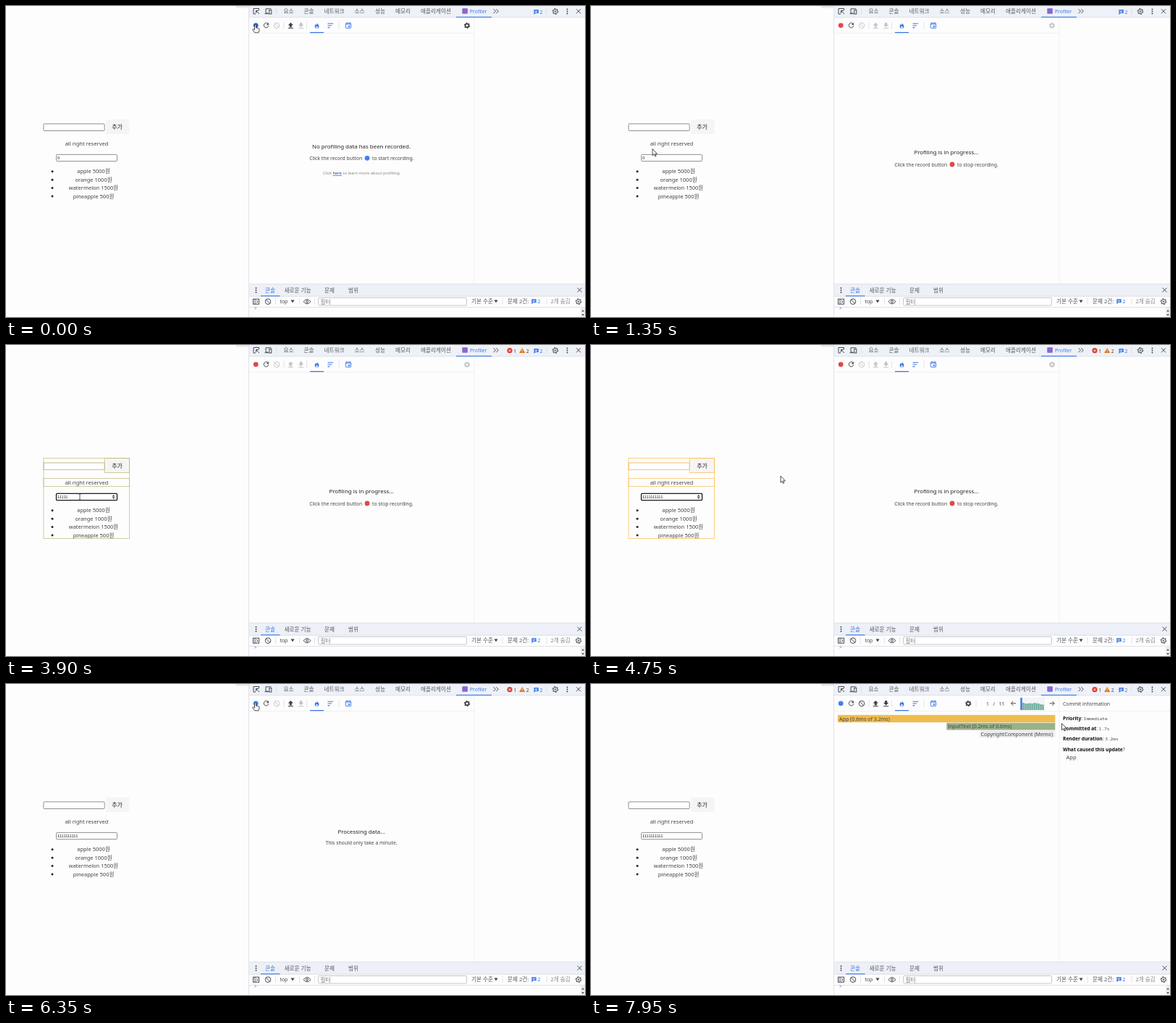
Animation of 800x430 px, one loop 8000 ms. Source, as an HTML page:

```html
<!DOCTYPE html>
<html lang="ko">
<head>
<meta charset="utf-8">
<style>
  html, body { margin: 0; width: 100%; height: 100%; overflow: hidden; background: #fefdfe; }
  svg { display: block; width: 100vw; height: 100vh; }
  text { font-family: "Noto Sans", "Noto Sans CJK KR", "Noto Sans CJK", sans-serif; font-size: 7.5px; fill: #444; white-space: pre; }
  .tab { font-size: 7.6px; fill: #55585d; }
  .small { font-size: 6.8px; }
  .head { font-size: 7.9px; fill: #222; }
  .mid { text-anchor: middle; }
  .mono { font-family: "Noto Sans Mono", "DejaVu Sans Mono", monospace; font-size: 6.1px; }
  .field { font-family: "Liberation Sans", Arial, sans-serif; font-size: 5.8px; fill: #222; }
  .blue { fill: #3b78e7; }
  .line { fill: none; stroke: #484b50; stroke-width: 1; }
  .off { opacity: .3; }
  .rule { fill: none; stroke: #d9dce3; stroke-width: .8; }
  .faint { fill: none; stroke: #f0f0f3; }
</style>
</head>
<body>
<svg viewBox="0 0 800 430" preserveAspectRatio="none">
  <defs>
    <linearGradient id="shade" x2="0" y2="1"><stop stop-color="#999" stop-opacity=".5"/><stop offset="1" stop-color="#999" stop-opacity="0"/></linearGradient>
    <g id="gear" fill="none" stroke="#484b50"><circle r="3.1" stroke-width="1"/><circle r="4" stroke-width="1" stroke-dasharray="1.7 2.49"/><circle r=".9" stroke-width=".9"/></g>
    <g id="solidGear" fill="none" stroke="#484b50"><circle r="2.4" stroke-width="1.9"/><circle r="3.6" stroke-width="1.2" stroke-dasharray="1.8 1.97"/></g>
    <g id="close" class="line"><path d="M-3-3 3 3M3-3-3 3"/></g>
    <g id="dots" fill="#3c3f43"><circle cy="-3" r=".9"/><circle r=".9"/><circle cy="3" r=".9"/></g>
    <g id="block" class="line"><circle r="3.8"/><path d="M-2.7-2.7 2.7 2.7"/></g>
    <path id="up" fill="#3c3f43" d="M0-4 3.6-.4H1.5V2.4H-1.5V-.4H-3.6ZM-3.6 3.2H3.6V4.2H-3.6Z"/>
    <path id="down" fill="#3c3f43" d="M0 2.4 3.6-1.2H1.5V-4H-1.5V-1.2H-3.6ZM-3.6 3.2H3.6V4.2H-3.6Z"/>
    <path id="issue" fill="#3b78e7" d="M-3.2-3H3.2V2H-1L-3.2 4ZM-1.8-1.5V-.7H1.8V-1.5ZM-1.8 .1V.9H1.2V.1Z" fill-rule="evenodd"/>
  </defs>

  <rect width="800" height="430" fill="#fefdfe"/>
  <rect x="318" width="182" height="4" fill="url(#shade)" opacity=".6"/>

  <!-- page -->
  <rect x="138" y="157" width="32.5" height="20" rx="2" fill="#f6f5f6"/>
  <text x="153.5" y="170" class="mid" style="font-size:8px;fill:#222">추가</text>
  <rect id="name" x="51.9" y="162.9" width="84.2" height="9.6" rx="1" fill="#fff" stroke="#858585" stroke-width=".9"/>
  <text x="111.5" y="193" class="mid">all right reserved</text>
  <rect id="amount" x="69.5" y="205.4" width="84" height="9.2" rx="1" fill="#fff"/>
  <text id="value" x="71" y="212" class="field"></text>
  <path id="spinner" d="M146.6 209.4 148.6 207 150.6 209.4ZM146.6 210.6 148.6 213 150.6 210.6Z" fill="#444"/>
  <g id="list"></g>
  <g id="outlines" fill="none" stroke-opacity=".7">
    <rect x="51.9" y="156.5" width="118.6" height="111"/>
    <rect x="51.9" y="162.9" width="84.2" height="9.4"/>
    <rect x="136.5" y="156.5" width="34" height="20"/>
    <rect x="51.9" y="184.5" width="118.6" height="11"/>
  </g>

  <!-- devtools chrome -->
  <rect x="336" width="464" height="15.5" fill="#eef1f7"/>
  <rect x="336" y="384.5" width="464" height="17" fill="#edf0f6"/>
  <path class="faint" d="M336 37.5H647M646.8 16V384"/>
  <path class="rule" d="M335.5 0V430M336 15.7H800M336 384.3H800M336 401.3H800M336 416.5H800M373.5 3V12M747 3V12"/>
  <g class="line"><path d="M349.5 6V3.5H342V11H345"/><path d="M345.5 6.5 350 11M345.5 10V6.5H349"/>
    <path d="M366.5 3.8H359V10H362.5M357.5 10.7H363"/><rect x="363.8" y="5.6" width="3" height="5.4"/></g>
  <g id="tabs"></g>
  <rect x="630.3" y="3.2" width="7.6" height="7.6" rx="1" fill="#8a66d2"/>
  <text x="641" y="10" class="small blue">Profiler</text>
  <path d="M622 14.8H671V16H622ZM352 400.2H378.5V401.4H352Z" fill="#4a82e8"/>
  <path class="line" d="M673.5 4.2 676.5 7.2 673.5 10.2M677.3 4.2 680.3 7.2 677.3 10.2"/>
  <g id="error"><circle cx="696" cy="7.7" r="3.6" fill="#d9402f"/><path d="M694.6 6.3 697.4 9.1M697.4 6.3 694.6 9.1" stroke="#fff" stroke-width=".9"/><text x="701.5" y="10.5" class="small">1</text></g>
  <g id="warning"><path d="M713.2 4 717.2 11H709.2Z" fill="#e8710a"/><path d="M713.2 6.2V8.6M713.2 9.3V10.2" stroke="#fff" stroke-width=".8"/><text x="718.8" y="10.5" class="small">2</text></g>
  <use href="#issue" x="732.7" y="8"/><text x="737.5" y="10.7" class="small blue">2</text>
  <use href="#gear" x="759" y="7.5"/><use href="#dots" x="775.5" y="7.5"/><use href="#close" x="791" y="7.3"/>

  <!-- console drawer -->
  <use href="#dots" x="345.5" y="393"/><use href="#close" x="792.5" y="392.7"/>
  <g class="line"><rect x="341.5" y="405.2" width="8" height="7"/><path d="M344 405V412M346 407 348 408.8 346 410.6"/>
    <path d="M411 408.7Q416 402.5 421 408.7Q416 415 411 408.7Z"/><circle cx="416" cy="408.7" r="1.5"/></g>
  <use href="#block" x="362" y="408.7"/>
  <text x="378.5" y="411.3" class="small">top</text><path d="M393.5 406.5H398.5L396 410.5Z" fill="#444"/>
  <path class="rule" d="M372.5 404V413M405.5 404V413M426.5 404V413M686 404V413M747 404V413"/>
  <rect x="431.5" y="403.4" width="205" height="10.6" rx="1.5" fill="#fff" stroke="#b6bac2" stroke-width=".8"/>
  <text x="434.5" y="411.5" class="tab" style="fill:#777">필터</text>
  <text x="643" y="411.3" class="tab">기본 수준</text><path d="M674.5 406.5H679.5L677 410.5Z" fill="#444"/>
  <text x="693" y="411.3" class="tab">문제 2건:</text>
  <use href="#issue" x="729.5" y="408.3"/><text x="734.5" y="411.3" class="small blue">2</text>
  <text x="752.5" y="411.3" class="tab" style="fill:#888">2개 숨김</text>
  <use href="#gear" x="791" y="408.7"/>
  <path d="M343.3 416.5 346 417.7 343.3 419.3" fill="none" stroke="#8fb2f0"/>
  <rect x="794" y="417" width="6" height="13" fill="#eee"/><path d="M795.2 422.5H799L797.1 420ZM795.2 426H799L797.1 428.5Z" fill="#555"/>

  <!-- profiler toolbar -->
  <circle id="record" cx="345.2" cy="26.8" r="3.4"/>
  <path class="line" d="M362.2 24.7A3.3 3.3 0 1 0 362.8 27.3"/><path d="M363 22.9V26.3H359.6Z" fill="#484b50"/>
  <use id="clear" href="#block" x="374" y="27"/>
  <use id="load" href="#up" x="393.3" y="27"/>
  <use id="save" href="#down" x="407.6" y="27"/>
  <path class="rule" d="M384 22V32M415.5 22V32M460 22V32"/>
  <path d="M429.7 23.2C430.2 25.2 432.5 25.6 432.4 27.9A2.9 2.9 0 0 1 426.6 27.9C426.7 26.4 427.5 25.9 427.8 25 428.5 25.4 428.8 25.9 428.9 26.4 429.6 25.7 429.9 24.5 429.7 23.2ZM429.5 28A1.2 1.2 0 0 0 429.5 30.4 1.2 1.2 0 0 0 429.5 28Z" fill="#3b78e7" fill-rule="evenodd"/>
  <path d="M420 36H439V37.2H420ZM444.5 23.7H452.2V24.8H444.5ZM444.5 26.5H450V27.6H444.5ZM444.5 29.3H447.4V30.4H444.5Z" fill="#3b78e7"/>
  <g fill="none" stroke="#3b78e7" stroke-width=".9"><rect x="469.4" y="23.8" width="7.2" height="6.7" rx=".6"/><path d="M469.3 25H476.7M471 22.5V24M475 22.5V24" stroke-width="1.1"/></g>
  <rect x="472.9" y="27.2" width="2.3" height="2" fill="#3b78e7"/>
  <use id="settings" href="#solidGear" y="27"/>

  <!-- profiler content -->
  <g id="idle">
    <text x="491" y="196.5" class="mid head">No profiling data has been recorded.</text>
    <text x="419.3" y="213" class="small">Click the record button</text><circle cx="499" cy="210.3" r="3.4" fill="#3b82f0"/><text x="506" y="213" class="small">to start recording.</text>
    <text x="491.5" y="233" class="mid" style="font-size:5.75px;fill:#888">Click <tspan style="fill:#1a3f9c;text-decoration:underline">here</tspan> to learn more about profiling.</text>
  </g>
  <g id="tooltip"><rect x="338.5" y="37.5" width="52" height="15" fill="#fff" stroke="#aaa" stroke-width=".8"/><text x="364.5" y="47.6" class="mid" style="font-size:6.5px">Start profiling</text></g>
  <g id="recording">
    <text x="491" y="205" class="mid head">Profiling is in progress...</text>
    <text x="419.3" y="221.6" class="small">Click the record button</text><circle cx="499" cy="219" r="3.4" fill="#e04848"/><text x="506" y="221.6" class="small">to stop recording.</text>
  </g>
  <g id="processing">
    <text x="491" y="207.2" class="mid head">Processing data...</text>
    <text x="491" y="221.6" class="mid small">This should only take a minute.</text>
  </g>
  <g id="result">
    <text x="546" y="29.6" class="small">1</text><text x="555.5" y="29.6" class="small">/</text><text x="563.5" y="29.6" class="small">11</text>
    <path class="rule" d="M532 22V32"/><path class="faint" d="M647 37.5H800"/>
    <path class="line" d="M587 26.8H580.5M583.5 23.8 580.5 26.8 583.5 29.8M633.7 26.8H640.2M637.2 23.8 640.2 26.8 637.2 29.8"/>
    <rect x="593" y="18.5" width="34" height="18" fill="#f3f4f6"/>
    <g id="bars"></g>
    <rect x="341" y="42.8" width="300.3" height="10.2" fill="#f0bc4d"/>
    <rect x="491.3" y="53.7" width="150" height="9.8" fill="#9bb18a"/>
    <rect x="537" y="64.4" width="104.3" height="9.6" fill="#ececee"/>
    <g style="font-size:7.1px"><text x="343" y="50.6" style="font-size:inherit">App (0.6ms of 3.2ms)</text>
      <text x="493" y="61.3" style="font-size:inherit">InputText (0.2ms of 0.6ms)</text>
      <text x="538.5" y="71.8" style="font-size:inherit">CopyrightComponent (Memo)</text></g>
    <text x="652" y="29.8" class="small">Commit information</text>
    <g id="facts"></g>
    <text x="656.5" y="104">App</text>
  </g>

  <g id="cursor">
    <path id="arrow" d="M0 0V9.2L2.1 7.3 3.5 10.4 4.9 9.8 3.5 6.8H6.4Z" fill="#fff" stroke="#222" stroke-width=".8"/>
    <path id="hand" d="M-1 .6Q0-.6 1 .6V4L5 5.2Q5.8 5.6 5.5 7L4.4 10.8H-.8L-3.8 6.8Q-3.4 5.4-2.2 6.1L-1 7Z" fill="#fff" stroke="#222" stroke-width=".8"/>
    <path id="beam" d="M-1.6-4H1.6M-1.6 4H1.6M0-4V4" fill="none" stroke="#333" stroke-width=".8"/>
  </g>
</svg>
<script>
const $ = id => document.getElementById(id);
const show = (id, on) => $(id).style.display = on ? '' : 'none';
const dim = (id, on) => $(id).classList.toggle('off', on);

$('list').innerHTML = ['apple 5000', 'orange 1000', 'watermelon 1500', 'pineapple 500'].map((item, i) =>
  `<circle cx="64" cy="${228.7 + i * 11.45}" r="1.5" fill="#222"/><text x="121" y="${231.2 + i * 11.45}" class="mid">${item}원</text>`).join('');

const tab = (y, active) => ([x, label]) => `<text x="${x}" y="${y}" class="tab${label === active ? ' blue' : ''}">${label}</text>`;
$('tabs').innerHTML =
  [[383.5, '요소'], [411.5, '콘솔'], [439.5, '네트워크'], [481.5, '소스'], [510, '성능'], [538, '메모리'], [573, '애플리케이션']].map(tab(10)).join('') +
  [[358, '콘솔'], [384.5, '새로운 기능'], [440, '문제'], [473, '범위']].map(tab(395.6, '콘솔')).join('');

$('bars').innerHTML = [17, 10, 9, 9, 9.5, 9, 10, 9.5, 9, 8, 7.5].map((h, i) =>
  `<rect x="${593.3 + i * 3}" y="${36 - h}" width="2.5" height="${h}" fill="${i ? '#6fae9f' : '#3b78e7'}"/>`).join('');

$('facts').innerHTML = [['Priority', ': ', 'Immediate'], ['Committed at', ': ', '1.7s'], ['Render duration', ': ', '3.2ms'], ['What caused this update', '?', '']].map(([name, mark, fact], i) =>
  `<text x="652" y="${50 + i * 14.2}" style="font-size:6.7px"><tspan font-weight="700" fill="#111">${name}</tspan>${mark}<tspan class="mono">${fact}</tspan></text>`).join('');

const keyTimes = [2750, 2900, 3100, 3350, 3900, 4000, 4100, 4250, 4400, 4500];

// time, x, y of the pointer
const path = [
  [0, 344.5, 26], [900, 344.5, 26], [1150, 150, 150], [1350, 85, 197.5], [1600, 88, 206], [3850, 88, 206],
  [3900, 102, 210], [4250, 294, 226], [4650, 294, 226], [4750, 262, 181], [4900, 262, 181],
  [5250, 350, 105], [5600, 383.5, 76], [5750, 362, 50], [6050, 344.5, 26], [6500, 344.5, 26],
  [6650, 560, 8], [6800, 679.5, 27.5], [7750, 679.5, 27.5], [7950, 650.5, 54.5], [8000, 650.5, 54.5]
];

function pointer(t) {
  const i = path.findIndex(p => p[0] > t);
  const [t0, x0, y0] = path[i - 1], [t1, x1, y1] = path[i];
  const k = (t - t0) / (t1 - t0);
  return [x0 + (x1 - x0) * k, y0 + (y1 - y0) * k];
}

function draw(t) {
  const recording = t >= 650 && t < 6350, done = t >= 7350;
  show('idle', t < 650);
  show('tooltip', t >= 450 && t < 650);
  show('recording', recording);
  show('processing', t >= 6350 && !done);
  show('result', done);
  $('record').setAttribute('fill', recording ? '#e04848' : t < 650 ? '#2c62c4' : '#3b82f0');
  dim('clear', !done);
  dim('load', recording);
  dim('save', !done);
  dim('settings', recording);
  $('settings').setAttribute('x', done ? 521.3 : 637);

  const typed = keyTimes.filter(k => k <= t).length;
  const focused = t >= 1850 && t < 4950;
  const outlined = t >= 2350 && t < 5000;
  $('value').textContent = t < 2350 ? '0' : '1'.repeat(typed);
  $('amount').setAttribute('stroke', focused ? '#1a1a1a' : '#858585');
  $('amount').setAttribute('stroke-width', focused ? 1.3 : .9);
  $('name').setAttribute('stroke-opacity', outlined ? .25 : 1);
  show('outlines', outlined);
  $('outlines').setAttribute('stroke', `rgb(${128 + 12 * typed},${179 + typed},${158 - 8 * typed})`);

  const warned = t >= 2550;
  show('error', t >= 2400);
  $('error').setAttribute('transform', `translate(${warned ? 0 : 17.2})`);
  show('warning', warned);

  const [x, y] = pointer(t);
  const overField = x > 69 && x < 154 && y > 204 && y < 216;
  const overRecord = Math.hypot(x - 345, y - 27) < 6;
  $('cursor').setAttribute('transform', `translate(${x} ${y})`);
  show('beam', overField);
  show('hand', overRecord);
  show('arrow', !overField && !overRecord);
  show('spinner', focused || overField);
}

function tick() {
  draw(Math.floor(performance.now() % 8000 / 50) * 50);
  requestAnimationFrame(tick);
}
tick();
</script>
</body>
</html>
```
